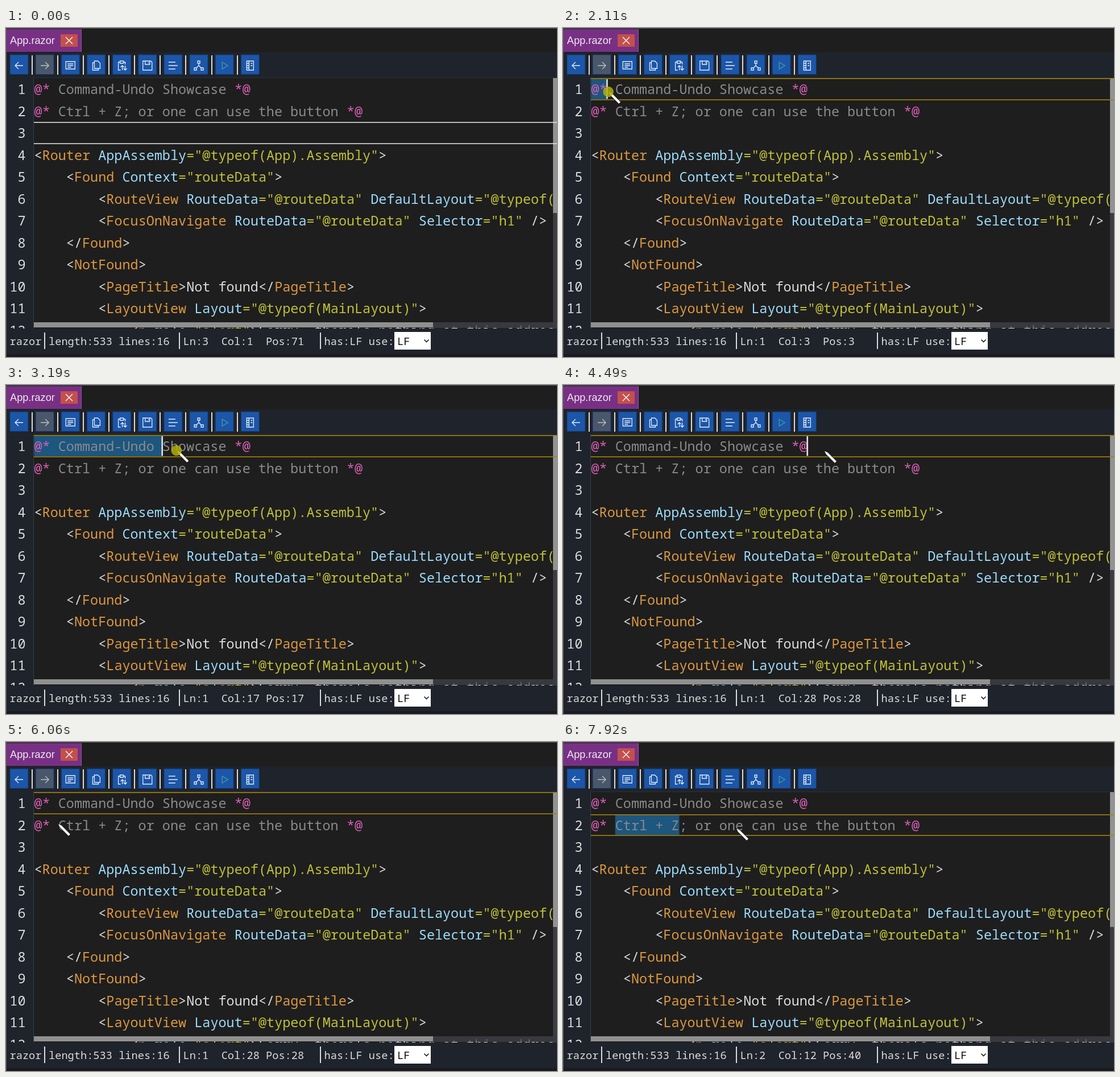
Write an HTML page with a canvas that moves like this. It is 969 by 578 pixels and loops after 7990 ms.

```html
<!DOCTYPE html>
<html lang="en">
<head>
<meta charset="utf-8">
<title>Code editor</title>
<style>
  html, body { margin: 0; width: 100%; height: 100%; overflow: hidden; background: #1e1e1e; }
  canvas { display: block; }
</style>
</head>
<body>
<canvas id="stage" width="969" height="578"></canvas>
<script>
const ctx = document.getElementById('stage').getContext('2d');
const LOOP = 7990;
const LEFT = 49.5, TOP = 88, ROW = 38.5, ADV = 14.09;
const MONO = '"Noto Sans Mono", monospace';
const CODE_FONT = ADV / 0.6 + 'px ' + MONO;
const STATUS_ADV = 11.2;
const STATUS_FONT = STATUS_ADV / 0.6 + 'px ' + MONO;
const COLORS = {
  w: '#dcdcdc', t: '#dd9840', a: '#9cdcfe', s: '#c0c03a', p: '#d95fb4', c: '#8a8a8a'
};

// Each run starts with a colour key and a bar.
const CODE = [
  ['p|@*', 'c| Command-Undo Showcase ', 'p|*@'],
  ['p|@*', 'c| Ctrl + Z; or one can use the button ', 'p|*@'],
  [],
  ['w|<', 't|Router', 'a| AppAssembly', 's|="@typeof(App).Assembly"', 'w|>'],
  ['w|    <', 't|Found', 'a| Context', 's|="routeData"', 'w|>'],
  ['w|        <', 't|RouteView', 'a| RouteData', 's|="@routeData"', 'a| DefaultLayout',
    's|="@typeof(MainLayout)"', 'w| />'],
  ['w|        <', 't|FocusOnNavigate', 'a| RouteData', 's|="@routeData"', 'a| Selector',
    's|="h1"', 'w| />'],
  ['w|    </', 't|Found', 'w|>'],
  ['w|    <', 't|NotFound', 'w|>'],
  ['w|        <', 't|PageTitle', 'w|>Not found</', 't|PageTitle', 'w|>'],
  ['w|        <', 't|LayoutView', 'a| Layout', 's|="@typeof(MainLayout)"', 'w|>'],
  ['w|            <', 't|p', 'a| role', 's|="alert"', "w|>Sorry, there's nothing at this address.</"]
];

// Pointer path: time, x, y
const PATH = [
  [0, 930, 640], [130, 868, 566], [350, 490, 340], [600, 190, 204], [800, 64, 143],
  [880, 50, 135], [1020, 69, 117], [1120, 95, 106], [1220, 109, 130], [1330, 100, 165],
  [1430, 75, 181], [1560, 30, 150], [1700, 17, 120], [1770, 13, 113], [1900, 48, 111],
  [2000, 76, 111], [2110, 80, 112], [2500, 168, 114], [2850, 235, 115], [3190, 300, 115],
  [3330, 380, 115], [3420, 440, 115], [3520, 457, 116], [4000, 460, 116], [4490, 460, 116],
  [4750, 390, 142], [5000, 275, 161], [5250, 202, 162], [5600, 140, 155], [5900, 96, 146],
  [6060, 92, 144], [6160, 92, 146], [6350, 120, 150], [6600, 180, 151], [6800, 207, 150],
  [6880, 209, 150], [7020, 234, 161], [7160, 234, 161], [7500, 280, 158], [7920, 305, 152],
  [7990, 306, 152]
];
const DRAGS = [
  { down: 1900, up: 3490, row: 0, from: 0, to: 27, keep: false, blink: 3490 },
  { down: 6160, up: 6840, row: 1, from: 3, to: 11, keep: true, blink: 6160 }
];
const LAG = 110;

function slope(i, axis) {
  const a = PATH[Math.max(i - 1, 0)], b = PATH[Math.min(i + 1, PATH.length - 1)];
  const k = PATH[i][axis];
  if ((k - a[axis]) * (b[axis] - k) <= 0) return 0;
  return (b[axis] - a[axis]) / (b[0] - a[0]);
}

function pointerAt(t) {
  let i = 0;
  while (i < PATH.length - 2 && t >= PATH[i + 1][0]) i++;
  const a = PATH[i], b = PATH[i + 1], span = b[0] - a[0];
  const s = (t - a[0]) / span, s2 = s * s, s3 = s2 * s;
  const at = axis => (2 * s3 - 3 * s2 + 1) * a[axis] + (s3 - 2 * s2 + s) * span * slope(i, axis)
    + (3 * s2 - 2 * s3) * b[axis] + (s3 - s2) * span * slope(i + 1, axis);
  return { x: at(1), y: at(2) };
}

function editorAt(t) {
  const drag = DRAGS.filter(d => t >= d.down).pop();
  if (!drag) return { row: 2, col: 0, pos: 71, focused: false };
  const { row, from, to } = drag;
  const held = t < drag.up;
  let col = to;
  if (held) {
    const x = pointerAt(Math.max(t - LAG, drag.down)).x;
    col = Math.min(to, Math.max(from, Math.round((x - LEFT) / ADV)));
  }
  const still = t >= drag.blink && !(held && !drag.keep);
  return {
    row, col, from, held, focused: true,
    pos: row * 28 + col + 1,
    selected: held || drag.keep,
    caret: !still || (t - drag.blink) % 1000 < 500
  };
}

function box(x, y, w, h, fill) {
  ctx.fillStyle = fill;
  ctx.fillRect(x, y, w, h);
}

function write(str, x, y, fill, font, align = 'left') {
  ctx.font = font;
  ctx.textAlign = align;
  ctx.fillStyle = fill;
  ctx.fillText(str, x, y);
}

function stroke(d, color, width = 1.3) {
  ctx.strokeStyle = color;
  ctx.lineWidth = width;
  ctx.stroke(new Path2D(d));
}

// Icons are drawn around the centre of their button.
const ICONS = [
  'M7 0H-7M-1-6L-7 0L-1 6',
  'M-7 0H7M1-6L7 0L1 6',
  'M-8-7H8V6H-8ZM-5-3H5M-5 0H5M-5 3H1',
  'M-3-8H3L7-4V5H-3ZM-3-5H-6V8H4V5',
  'M-3-6H-6V8H-2M3-6H6V-2M-3-8H3V-4H-3ZM1 8V0M-2 3L1 0L4 3M6 0V8M3 5L6 8L9 5',
  'M-8-8H6L8-6V8H-8ZM-4-8V-2H4V-8M2-6V-4',
  'M-8-6H4M-8 0H8M-8 6H4',
  'M-2-8H2V-4H-2ZM0-4V0L-5 5M0 0L5 5M-8 4H-4V8H-8ZM4 4H8V8H4Z',
  'M-4-6L6 0L-4 6Z',
  'M-6-8H6V8H-6ZM-2-8V8M-6-4H-2M-6 0H-2M-6 4H-2M1-4H4M1 0H4'
];

function drawTop() {
  box(0, 0, 969, 43, '#1e1e1e');
  box(0, 0, 969, 1, '#55555a');
  box(0, 2, 133, 40, '#783084');
  box(132, 2, 1, 40, '#92559b');
  write('App.razor', 7, 28, '#f0e8f2', '18.2px "Liberation Sans", Arial, sans-serif');
  box(96, 11, 30, 22, '#c2504d');
  stroke('M105 16L117 28M117 16L105 28', '#f4eeee', 1.5);

  box(0, 43, 969, 45, '#1f232b');
  ICONS.forEach((icon, i) => {
    const cx = 23 + i * 45.15;
    const color = i === 1 ? '#b9c0c9' : i === 8 ? '#3f9fa5' : '#e6edf5';
    box(cx - 16.5, 46.5, 33, 35.5, '#12386f');
    box(cx - 15.5, 47.5, 31, 33.5, i === 1 ? '#4a576a' : '#1c56a8');
    ctx.save();
    ctx.translate(cx, 66);
    stroke(icon, color);
    ctx.restore();
    if (i) box(Math.round(cx - 23.6), 48, 2, 34, '#dcdcdc');
  });
}

function drawCode(state) {
  box(0, 87, 969, 441, '#1e1e1e');
  box(0, 87, 48, 441, '#1f232b');
  box(48, 87, 1, 441, '#34424f');
  box(49, 87, 920, 1, '#2b2f36');

  ctx.save();
  ctx.beginPath();
  ctx.rect(0, 88, 969, 440);
  ctx.clip();
  const top = TOP + state.row * ROW;
  if (state.selected) {
    box(LEFT + state.from * ADV, top + 1.5, (state.col - state.from) * ADV, ROW - 3, '#1d567f');
  }
  CODE.forEach((runs, i) => {
    const base = 116 + i * ROW;
    write(i + 1, 34.5, base, '#dcdcdc', CODE_FONT, 'right');
    let col = 0;
    for (const run of runs) {
      const str = run.slice(2);
      write(str, LEFT + col * ADV, base, COLORS[run[0]], CODE_FONT);
      col += str.length;
    }
  });
  ctx.restore();

  box(751, 517, 211, 10, 'rgba(62,64,72,.8)');
  box(49, 517, 702, 9, '#909090');
  box(962, 88, 7, 440, '#3c3d42');
  box(962, 88, 7, 237, '#929292');

  const line = state.focused ? '#a5820c' : '#dedede';
  box(49, Math.round(top), 920, 1.6, line);
  box(49, Math.round(top + ROW) - 1.6, 920, 1.6, line);
  if (state.caret) box(LEFT + state.col * ADV - 1.5, top + 2, 2.6, ROW - 4, '#e4e4e4');
}

function drawStatus(state) {
  box(0, 528, 969, 46, '#1f232b');
  box(0, 573, 969, 5, '#1b1a20');
  const label = (str, x, fill = '#dcdcdc') => write(str, x, 556.5, fill, STATUS_FONT);
  const col = ('Col:' + (state.col + 1)).padEnd(7);
  label('razor', 6.5);
  label('length:533 lines:16', 75);
  label('Ln:' + (state.row + 1) + '  ' + col + 'Pos:' + state.pos, 311.5);
  label('has:LF use:', 559.5);
  for (const x of [67, 304, 552]) box(x, 535, 2, 29, '#dcdcdc');
  box(683, 534, 64, 31, '#ffffff');
  label('LF', 688, '#111111');
  stroke('M735.5 547.5L739.5 551.5L743.5 547.5', '#222222', 1.7);
  box(0, 0, 1, 578, '#55555a');
}

function drawPointer({ x, y }, held) {
  ctx.save();
  ctx.translate(x, y);
  const pen = new Path2D('M0 0L5.5 2.5L21 18L18 21L2.5 5.5Z');
  ctx.strokeStyle = '#151515';
  ctx.lineWidth = 1.6;
  ctx.lineJoin = 'round';
  ctx.stroke(pen);
  ctx.fillStyle = '#f5f5f5';
  ctx.fill(pen);
  if (held) {
    ctx.beginPath();
    ctx.arc(-0.5, 0, 9.3, 0, 7);
    ctx.fillStyle = 'rgba(176,174,10,.85)';
    ctx.fill();
  }
  ctx.restore();
}

function draw(t) {
  const state = editorAt(t);
  drawTop();
  drawCode(state);
  drawStatus(state);
  if (t >= 130) drawPointer(pointerAt(t), state.held);
}

const start = performance.now();
function tick() {
  draw((performance.now() - start) % LOOP);
  requestAnimationFrame(tick);
}
tick();
</script>
</body>
</html>
```
